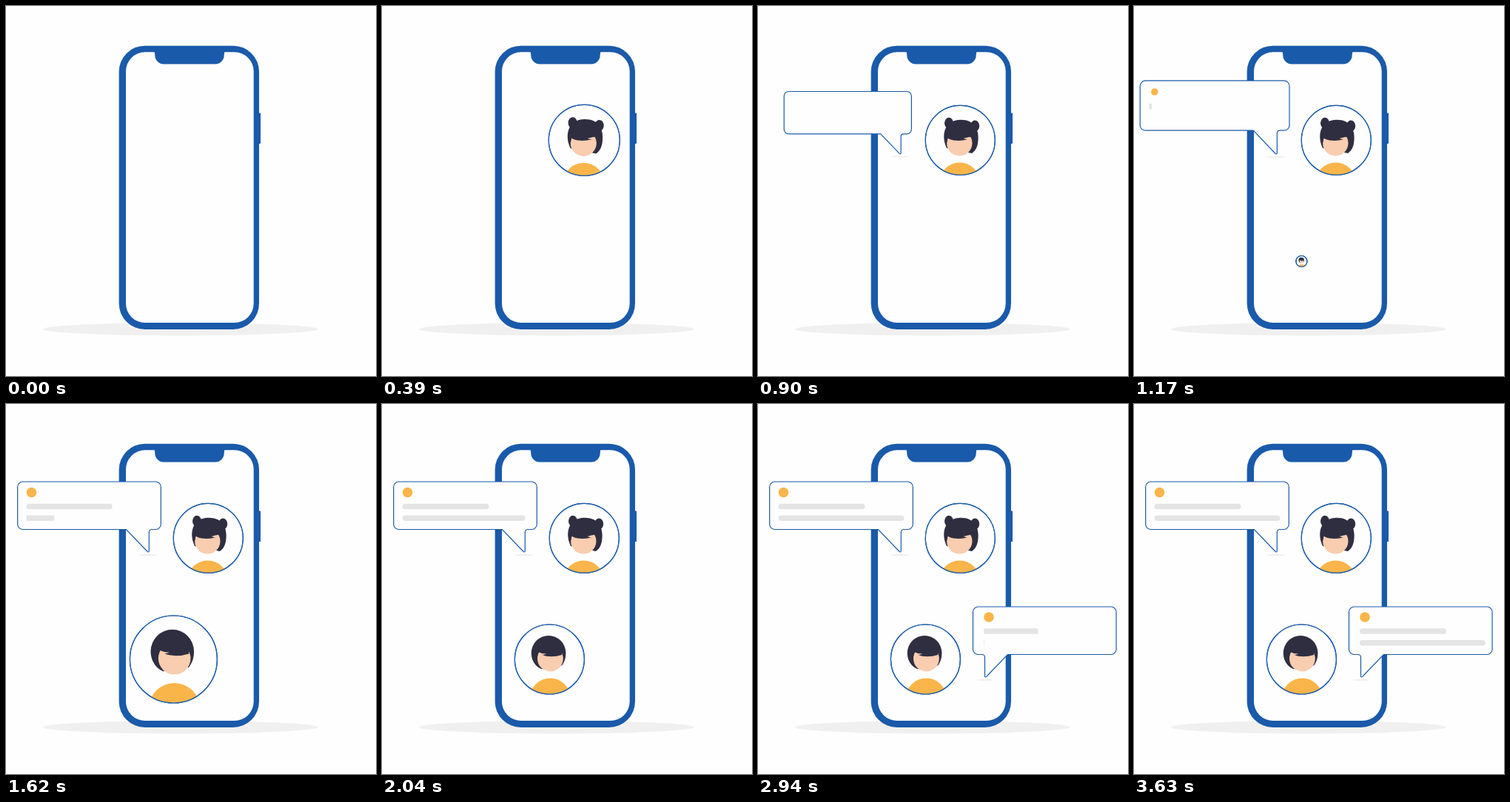
Recreate the animation shown at these times as an HTML page. Size 500 px wide and 500 px high, loop 5010 ms.

```html
<!DOCTYPE html>
<html lang="en">
<head>
<meta charset="utf-8">
<title>Phone chat</title>
<style>
  html, body { margin: 0; width: 100%; height: 100%; overflow: hidden; background: #fefefe; }
  svg { display: block; width: 100%; height: 100%; }
  .outline { fill: #fefefe; stroke: #1a5aaa; stroke-width: 1.2; vector-effect: non-scaling-stroke; }
  .ring { fill: none; }
  .blue { fill: #1a5aaa; }
  .paper { fill: #fefefe; }
  .hair { fill: #2f2e41; }
  .skin { fill: #f9cdb0; }
  .amber { fill: #fab54a; }
  .line { fill: #e4e4e4; }
  .shade { fill: #f0f0f0; }
</style>
</head>
<body>
<svg viewBox="0 0 500 500">
  <defs>
    <clipPath id="clip1"><circle cx="273.3" cy="181.3" r="47"/></clipPath>
    <clipPath id="clip2"><circle cx="226.4" cy="345" r="47"/></clipPath>
    <path id="bubble" class="outline" d="M22.7 105H202.3a7 7 0 0 1 7 7V162.5a7 7 0 0 1-7 7H197.3q-4 0-4 4V198q0 3.4-2.6 1L162.5 169.5H22.7a7 7 0 0 1-7-7V112a7 7 0 0 1 7-7z"/>
  </defs>

  <ellipse class="shade" cx="235.5" cy="436.7" rx="185.5" ry="8.7"/>
  <rect class="blue" x="338" y="144.5" width="6" height="41.5" rx=".6"/>
  <rect class="blue" x="152.7" y="53.7" width="189.3" height="383.3" rx="35"/>
  <rect class="paper" x="162" y="62.3" width="172.7" height="365.7" rx="26"/>
  <path class="blue" d="M199 60Q201.3 62 201.3 66.5A12 12 0 0 0 213.3 78.6H282.7A12 12 0 0 0 294.7 66.5Q294.7 62 297 60z"/>

  <g id="girl">
    <circle class="outline" cx="273.3" cy="181.3" r="47"/>
    <g clip-path="url(#clip1)">
      <ellipse class="amber" cx="272.5" cy="238" rx="27" ry="26.6"/>
      <ellipse class="hair" cx="258" cy="158.3" rx="6" ry="7.5"/>
      <ellipse class="hair" cx="293.2" cy="162" rx="6" ry="7.5"/>
      <path class="hair" d="M255 192C247 176 251 153.7 274 153.7C293 153.7 297.6 167 297.6 178C297.6 188 295 195 289 199z"/>
      <circle class="skin" cx="272.3" cy="185.3" r="17.2"/>
      <path class="hair" d="M253.5 179L258 166H288L290.5 176.5Q285 176.5 277.5 179Q281 180.5 284 180Q276 182.3 268 181.8Q260 181.3 256.5 178.5L255 186z"/>
    </g>
    <circle class="outline ring" cx="273.3" cy="181.3" r="47"/>
  </g>

  <g id="boy">
    <circle class="outline" cx="226.4" cy="345" r="47"/>
    <g clip-path="url(#clip2)">
      <ellipse class="amber" cx="227.3" cy="398" rx="27.5" ry="27.5"/>
      <path class="hair" d="M215 358C206 354 201.8 345 201.8 336.5A23.3 23.6 0 0 1 248.4 336.5C248.4 343 247 348 243 353.5z"/>
      <circle class="skin" cx="227.4" cy="344" r="17.4"/>
      <path class="hair" d="M209 344L211.5 324H243L245.8 344L243 335.5V339Q236 341.2 229 341.2Q221 341 217 338.9Q220 338.9 222 337.5Q215 337.5 211.5 335z"/>
    </g>
    <circle class="outline ring" cx="226.4" cy="345" r="47"/>
  </g>

  <g id="chat1">
    <ellipse class="shade" cx="192" cy="204" rx="12" ry="1.3"/>
    <use href="#bubble"/>
    <g id="text1"></g>
  </g>
  <g id="chat2">
    <ellipse class="shade" cx="307.3" cy="372.8" rx="12" ry="1.3"/>
    <use href="#bubble" transform="translate(499.8 169) scale(-1 1)"/>
    <g id="text2" transform="translate(277.5 168.5)"></g>
  </g>
</svg>
<script>
const LOOP = 5010, FALL = 160;
const get = id => document.getElementById(id);

for (const id of ['text1', 'text2']) {
  get(id).innerHTML =
    '<circle class="amber" cx="34.5" cy="119.5" r="6.8"/>' +
    '<rect class="line" x="27.5" y="134.8" width="117" height="7.5" rx="3.75"/>' +
    '<rect class="line" x="27.5" y="150.4" width="170" height="7.5" rx="3.75"/>';
}

const progress = (t, start, length) => Math.min(1, Math.max(0, (t - start) / length));
const sine = u => (1 - Math.cos(Math.PI * u)) / 2;
const swell = u => 1 - (1 - u ** 1.7) ** 2.6;

function scale(el, x, y, sx, sy = sx) {
  el.style.display = sx > 0 ? '' : 'none';
  el.setAttribute('transform', `translate(${x} ${y}) scale(${sx} ${sy}) translate(${-x} ${-y})`);
}

// Grow from nothing to an overshoot, then drop back to full size
function pop(t, id, x, y, start, peak, top) {
  const up = swell(progress(t, start, peak - start));
  const down = sine(progress(t, peak, FALL));
  scale(get(id), x, y, top * up - (top - 1) * down);
}

function write(t, id, start) {
  const [dot, first, second] = get(id).children;
  scale(dot, 34.5, 119.5, sine(progress(t, start - 50, 180)));
  scale(first, 27.5, 138, sine(progress(t, start, 540)), 1);
  scale(second, 27.5, 154, sine(progress(t, start + 288, 710)), 1);
}

function draw(now) {
  const t = now % LOOP;
  pop(t, 'girl', 273.3, 181.3, 10, 603, 1.265);
  pop(t, 'chat1', 192, 200, 545, 1090, 1.085);
  pop(t, 'boy', 226.4, 345, 1080, 1600, 1.265);
  pop(t, 'chat2', 307.3, 369, 2160, 2600, 1.085);
  write(t, 'text1', 1110);
  write(t, 'text2', 2625);
}

let begin;
function tick(now) {
  begin ??= now;
  draw(now - begin);
  requestAnimationFrame(tick);
}
draw(0);
requestAnimationFrame(tick);
</script>
</body>
</html>
```
